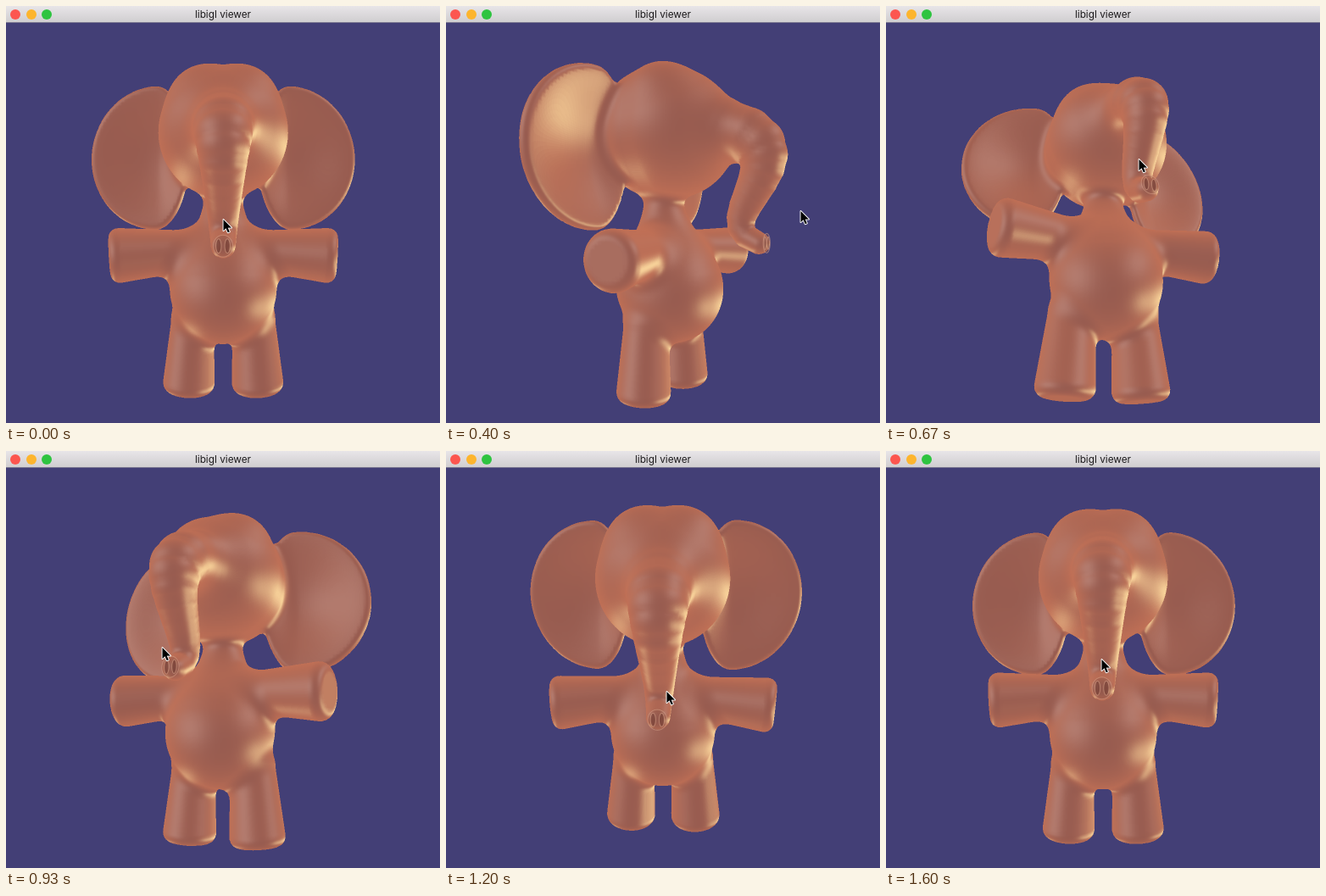
Write an HTML page with a canvas that moves like this. It is 512 by 492 pixels and loops after 1.67 s.

```html
<!DOCTYPE html>
<html lang="en">
<head>
<meta charset="utf-8">
<title>libigl viewer</title>
<style>
  html, body { margin: 0; width: 100%; height: 100%; overflow: hidden; background: #433f76; }
  canvas { position: absolute; left: 0; top: 0; width: 512px; height: 492px; }
  header {
    position: absolute; left: 0; top: 0; width: 512px; height: 19px;
    background: linear-gradient(#e8e5e8, #d0ced0); border-bottom: 1px solid #77748f;
    font: 11.8px/20px Inter, Roboto, sans-serif; color: #1c1a1c; text-align: center;
  }
  i { position: absolute; top: 3.5px; width: 12px; height: 12px; border-radius: 50%; }
</style>
</head>
<body>
<header>
  <i style="left:5px;background:#fc5650"></i>
  <i style="left:23.5px;background:#fdb52e"></i>
  <i style="left:42px;background:#2ec440"></i>
  libigl viewer
</header>
<canvas width="1024" height="984"></canvas>
<script>
const W = 1024, H = 984, SCALE = 2, CAMERA = 570, LOOP = 1670;
const canvas = document.querySelector('canvas');
const ctx = canvas.getContext('2d');
const clamp = (v, lo, hi) => v < lo ? lo : v > hi ? hi : v;
const mix = (a, b, t) => a + (b - a) * t;

// ---- Distance field: x right, y down, z towards the viewer, mirrored in x ----

function smin(a, b, k) {
  const h = Math.max(k - Math.abs(a - b), 0) / k;
  return Math.min(a, b) - h * h * k / 4;
}

// Tapered capsule
function cone(x, y, z, ax, ay, az, ra, bx, by, bz, rb) {
  const dx = bx - ax, dy = by - ay, dz = bz - az;
  x -= ax; y -= ay; z -= az;
  const t = clamp((x * dx + y * dy + z * dz) / (dx * dx + dy * dy + dz * dz), 0, 1);
  x -= dx * t; y -= dy * t; z -= dz * t;
  return Math.sqrt(x * x + y * y + z * z) - mix(ra, rb, t);
}

// Box profile with rounded corners
function rounded(u, v, e) {
  u += e; v += e;
  const a = Math.max(u, 0), b = Math.max(v, 0);
  return Math.min(Math.max(u, v), 0) + Math.sqrt(a * a + b * b) - e;
}

// Tapered cylinder with rounded flat ends
function limb(x, y, z, ax, ay, az, ra, bx, by, bz, rb, e) {
  const dx = bx - ax, dy = by - ay, dz = bz - az;
  const len = Math.sqrt(dx * dx + dy * dy + dz * dz);
  x -= ax; y -= ay; z -= az;
  const h = (x * dx + y * dy + z * dz) / len;
  const radial = Math.sqrt(Math.max(x * x + y * y + z * z - h * h, 0));
  return rounded(radial - mix(ra, rb, clamp(h / len, 0, 1)), Math.abs(h - len / 2) - len / 2, e);
}

// Egg-shaped dish, wide outside and narrow towards the head
function ear(x, y, z) {
  const a = x > 84 ? 84 : 42, b = 89;
  const u = (x - 84) / a, v = (y + 81) / b, r = Math.sqrt(u * u + v * v);
  const edge = r * (r - 1) / Math.max(Math.hypot(u / a, v / b), 1e-4);
  const hollow = Math.max(0, 1 - r * r);
  return rounded(edge, Math.abs(z + 30 + 0.2 * (x - 78) + 18 * hollow * hollow) - 7, 6.5);
}

// Trunk: a Bezier centreline in the plane x = 0 with a shrinking radius
const bezier = (t, a, b, c, d) =>
  (1 - t) ** 3 * a + 3 * (1 - t) ** 2 * t * b + 3 * (1 - t) * t * t * c + t ** 3 * d;
const trunk = Array.from({ length: 13 }, (_, i) => {
  const t = i / 12;
  return { y: bezier(t, -106, -87, -3, 21), z: bezier(t, 45, 222, 43, 121), r: 36 * 0.32 ** t };
});

function trunkField(x, y, z) {
  let d = 1e3;
  if (z < -25) return d;
  for (let i = 1; i < trunk.length; i++) {
    const a = trunk[i - 1], b = trunk[i];
    d = Math.min(d, cone(x, y, z, 0, a.y, a.z, a.r, 0, b.y, b.z, b.r));
  }
  return d;
}

function field(x, y, z) {
  x = Math.abs(x);
  let head = cone(x, y, z, 0, -103, -4, 73, 0, -103, 14, 74);
  head = smin(head, cone(x, y, z, 20, -138, 12, 43, 18, -131, -14, 43), 12);
  head = smin(head, trunkField(x, y, z), 20);
  head = smin(head, ear(x, y, z), 12);
  let body = cone(x, y, z, 0, -30, 0, 22, 0, 60, 5, 38);
  body = smin(body, cone(x, y, z, 0, 74, 9, 60, 0, 78, 11, 60), 40);
  body = smin(body, limb(x, y, z, 25, 31, 6, 22, 128, 37, 26, 32, 12), 20);
  body = smin(body, limb(x, y, z, 35, 100, 2, 24, 41, 198, 2, 31, 12), 14);
  return smin(head, body, 14);
}

// ---- Mesh: one vertex per crossed grid cell, pulled onto the surface ----

const STEP = 4, NX = 93, NY = 104, NZ = 62, ORIGIN = [-184, -200, -88];
const verts = [], normals = [], faces = [];

function buildMesh() {
  const strides = [1, NX, NX * NY];
  const values = new Float32Array(NX * NY * NZ), ids = new Int32Array(values.length).fill(-1);
  const at = (n, half) => [
    ORIGIN[0] + (n % NX + half) * STEP,
    ORIGIN[1] + (Math.floor(n / NX) % NY + half) * STEP,
    ORIGIN[2] + (Math.floor(n / strides[2]) + half) * STEP];
  for (let n = 0; n < values.length; n++) values[n] = field(...at(n, 0));

  const gradient = (x, y, z, e = 0.8) => [
    field(x + e, y, z) - field(x - e, y, z),
    field(x, y + e, z) - field(x, y - e, z),
    field(x, y, z + e) - field(x, y, z - e)].map(g => g / (2 * e));

  function vertex(cell) {
    if (ids[cell] < 0) {
      let p = at(cell, 0.5), g;
      for (let pass = 0; pass < 3; pass++) {
        g = gradient(...p);
        const pull = field(...p) / Math.max(g[0] * g[0] + g[1] * g[1] + g[2] * g[2], 0.3);
        p = p.map((v, a) => v - clamp(g[a] * pull, -STEP, STEP));
      }
      g = gradient(...p, 2);
      const len = Math.hypot(...g) || 1;
      ids[cell] = verts.length / 3;
      verts.push(...p);
      normals.push(...g.map(v => v / len));
    }
    return ids[cell];
  }

  for (let n = strides[2] + NX + 1; n < values.length - strides[2]; n++) {
    for (let a = 0; a < 3; a++) {
      if (values[n] < 0 === values[n + strides[a]] < 0) continue;
      const b = strides[(a + 1) % 3], c = strides[(a + 2) % 3];
      const q = [n, n - b, n - b - c, n - c].map(vertex);
      faces.push(q[0], q[1], q[2], q[0], q[2], q[3]);
    }
  }
}

// ---- Material: colour looked up by the view-space normal ----

const MAUVE = [194, 148, 138], CREAM = [255, 222, 162];
const lights = [
  { x: -0.5, y: 0.2, size: 0.22, power: 0.5, tint: MAUVE },
  { x: 0.5, y: 0.4, size: 0.17, power: 0.45, tint: MAUVE },
  { x: 0.6, y: -0.22, size: 0.14, power: 0.4, tint: CREAM },
  { x: -0.62, y: -0.7, size: 0.14, power: 0.4, tint: CREAM },
  { x: 0.95, y: -0.25, size: 0.18, power: 0.9, tint: CREAM }];

const MAP = 128;
const material = Uint32Array.from({ length: MAP * MAP }, (_, n) => {
  const x = n % MAP / (MAP - 1) * 2 - 1, y = 1 - Math.floor(n / MAP) / (MAP - 1) * 2;
  const edge = Math.min(1, x * x + y * y);
  let colour = [mix(152, 192, edge), mix(92, 112, edge), mix(80, 86, edge)];
  for (const { x: lx, y: ly, size, power, tint } of lights) {
    const glow = power * Math.exp(-((x - lx) ** 2 + (y - ly) ** 2) / (2 * size * size));
    colour = colour.map((c, i) => mix(c, tint[i], glow));
  }
  return (255 << 24 | colour[2] << 16 | colour[1] << 8 | colour[0]) >>> 0;
});

// ---- Rendering ----

const image = ctx.createImageData(W, H);
const pixels = new Uint32Array(image.data.buffer);
const depth = new Float32Array(W * H);

function viewFrom(yaw, pitch) {
  const rad = Math.PI / 180;
  const c = Math.cos(yaw * rad), s = Math.sin(yaw * rad);
  const cp = Math.cos(pitch * rad), sp = Math.sin(pitch * rad);
  return (x, y, z) => {
    const turned = z * c - x * s;
    return [x * c + z * s, y * cp + turned * sp, turned * cp - y * sp];
  };
}

function project([x, y, z]) {
  const k = CAMERA / (CAMERA - z);
  return [(256 + x * k) * SCALE, (256 + y * k) * SCALE, k];
}

function drawMesh(rotate) {
  pixels.fill(0);
  depth.fill(0);
  const count = verts.length, P = new Float32Array(count), N = new Float32Array(count);
  for (let i = 0; i < count; i += 3) {
    P.set(project(rotate(verts[i], verts[i + 1], verts[i + 2])), i);
    N.set(rotate(normals[i], normals[i + 1], normals[i + 2]), i);
  }
  for (let f = 0; f < faces.length; f += 3) {
    const a = faces[f] * 3, b = faces[f + 1] * 3, c = faces[f + 2] * 3;
    if (N[a + 2] < -0.3 && N[b + 2] < -0.3 && N[c + 2] < -0.3) continue;
    const ax = P[a], ay = P[a + 1], bx = P[b] - ax, by = P[b + 1] - ay, cx = P[c] - ax, cy = P[c + 1] - ay;
    const area = bx * cy - by * cx;
    if (Math.abs(area) < 1e-6) continue;
    const x0 = Math.max(0, Math.ceil(ax + Math.min(0, bx, cx))), x1 = Math.min(W - 1, ax + Math.max(0, bx, cx));
    const y0 = Math.max(0, Math.ceil(ay + Math.min(0, by, cy))), y1 = Math.min(H - 1, ay + Math.max(0, by, cy));
    for (let y = y0; y <= y1; y++) {
      for (let x = x0; x <= x1; x++) {
        const dx = x - ax, dy = y - ay;
        const v = (dx * cy - dy * cx) / area, w = (bx * dy - by * dx) / area, u = 1 - v - w;
        if (u < -1e-4 || v < -1e-4 || w < -1e-4) continue;
        const near = u * P[a + 2] + v * P[b + 2] + w * P[c + 2], n = y * W + x;
        if (near <= depth[n]) continue;
        depth[n] = near;
        const nx = u * N[a] + v * N[b] + w * N[c], ny = u * N[a + 1] + v * N[b + 1] + w * N[c + 1];
        const col = clamp((nx + 1) * 63.5, 0, 127) | 0, row = clamp((ny + 1) * 63.5, 0, 127) | 0;
        pixels[n] = material[row * MAP + col];
      }
    }
  }
  ctx.putImageData(image, 0, 0);
}

// Oval lying on the end of the trunk
function tipOval(rotate, x, rx, ry, stroke, fill) {
  ctx.beginPath();
  for (let i = 0; i < 24; i++) {
    const a = i / 12 * Math.PI;
    ctx.lineTo(...project(rotate(x + rx * Math.cos(a), 21 + ry * Math.sin(a), 130)).slice(0, 2));
  }
  ctx.closePath();
  ctx.lineWidth = 2;
  ctx.strokeStyle = stroke;
  ctx.fillStyle = fill;
  ctx.fill();
  ctx.stroke();
}

const arrow = new Path2D('M0 0V14.2L3.3 11.2L5.7 16.6L8 15.6L5.7 10.4H10.3Z');

function drawCursor({ x, y }) {
  ctx.save();
  ctx.scale(SCALE, SCALE);
  ctx.translate(x + 0.5, y + 1);
  ctx.scale(0.92, 0.92);
  ctx.lineWidth = 2;
  ctx.lineJoin = 'round';
  ctx.strokeStyle = '#fff';
  ctx.fillStyle = '#000';
  ctx.stroke(arrow);
  ctx.fill(arrow);
  ctx.restore();
}

// ---- Motion: the cursor follows a smooth path and drags the model a little behind it ----

const path = [[0, 256, 251], [4, 339, 280], [6, 418, 241], [10, 298, 180],
              [14, 184, 231], [16, 185, 268], [18, 260, 283], [24, 254, 245]];
const LAG = 0.45;

function cursorAt(step) {
  const s = clamp(step, 0, 24), last = path.length - 1;
  const i = clamp(path.findIndex(p => p[0] > s) - 1, 0, last - 1) + (s === 24 ? last - 1 : 0);
  const a = path[i], b = path[i + 1], span = b[0] - a[0], t = (s - a[0]) / span;
  const slope = (n, axis) => {
    const p = path[Math.max(n - 1, 0)], q = path[Math.min(n + 1, last)];
    return (q[axis] - p[axis]) / (q[0] - p[0]) * span;
  };
  const along = axis => bezier(t, a[axis], a[axis] + slope(i, axis) / 3, b[axis] - slope(i + 1, axis) / 3, b[axis]);
  return { x: along(1), y: along(2) };
}

let shown = -1;
function tick() {
  // 15 steps a second, switching on whole hundredths
  const t = performance.now() % LOOP;
  const step = Math.min(24, Math.floor((Math.floor(t / 10) * 10 + 4) * 15 / 1000));
  if (step !== shown) {
    shown = step;
    const grip = cursorAt(step - LAG);
    const rotate = viewFrom((grip.x - 256) * 0.352, (grip.y - 251) * 0.385);
    drawMesh(rotate);
    tipOval(rotate, 0, 9, 10, 'rgba(220,165,140,.5)', 'rgba(140,84,72,.3)');
    for (const side of [-4, 4]) tipOval(rotate, side, 2.4, 6.5, 'rgba(215,160,135,.6)', 'rgba(120,66,56,.7)');
    drawCursor(cursorAt(step));
  }
  requestAnimationFrame(tick);
}

buildMesh();
tick();
</script>
</body>
</html>
```
